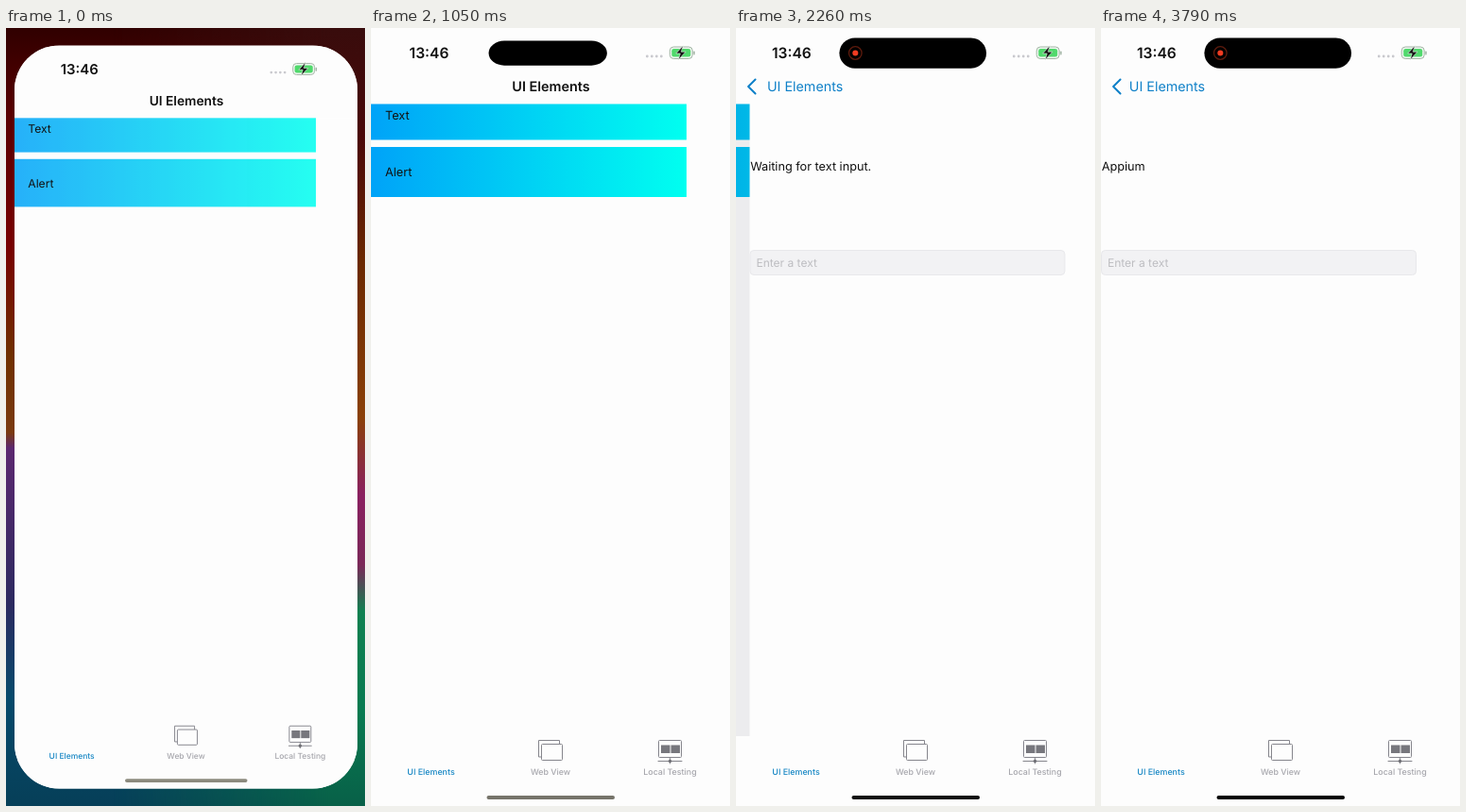
An HTML page that plays this animation: 380 by 824 pixels, repeating every 3840 ms.

```html
<!DOCTYPE html>
<html lang="en">
<head>
<meta charset="utf-8">
<title>UI Elements</title>
<style>
  html, body { margin: 0; width: 100%; height: 100%; overflow: hidden; }
  body > * { position: absolute; left: 0; top: 0; width: 380px; height: 824px; }
  #wallLeft { background: linear-gradient(#300000, #5c0000 12%, #780000 28%, #703000 42%, #7a3a10 52%, #5c2870 54%, #2c2a60 74%, #064a6c 86%, #063f58); }
  #wallRight {
    background: linear-gradient(#380c0c, #4a0808 14%, #6a2800 30%, #8a4008 50%, #8a2060 60%, #7a2858 69%, #108050 75%, #087a50 88%, #086048);
    mask-image: linear-gradient(90deg, transparent 30%, #000 90%);
  }
  text { font-family: Inter, Roboto, sans-serif; text-rendering: geometricPrecision; white-space: pre; }
</style>
</head>
<body>
<div id="wallLeft"></div>
<div id="wallRight"></div>
<svg id="screen" viewBox="0 0 380 824"></svg>
<script>
const LOOP = 3840, KEYBOARD_HEIGHT = 281;
const PAPER = '#fdfdfd', BLUE = '#0f80c8', HINT = '#bdbdc1', OUTLINE = '#85858c', INACTIVE = '#a6a6ac';

const rect = (x, y, w, h, fill, rx = 0, extra = '') =>
  `<rect x="${x}" y="${y}" width="${w}" height="${h}" rx="${rx}" fill="${fill}" ${extra}/>`;
const circle = (x, y, r, fill, extra = '') =>
  `<circle cx="${x}" cy="${y}" r="${r}" fill="${fill}" ${extra}/>`;
const path = (d, stroke, width = 1, fill = 'none') =>
  `<path d="${d}" fill="${fill}" stroke="${stroke}" stroke-width="${width}" stroke-linejoin="round" stroke-linecap="round"/>`;
const text = (x, y, str, size, fill = '#111', weight = 400, anchor = 'start', extra = '') =>
  `<text x="${x}" y="${y}" font-size="${size}" fill="${fill}" font-weight="${weight}" text-anchor="${anchor}" ${extra}>${str}</text>`;
const group = (id, ...parts) => `<g id="${id}">${parts.join('')}</g>`;

const home = group('home',
  rect(0, 0, 380, 824, PAPER),
  group('buttons',
    rect(0, 66, 334, 52.5, 'url(#sky)'),
    rect(0, 126, 334, 53, 'url(#sky)')),
  text(15, 96.6, 'Text', 12.7),
  text(15, 157.2, 'Alert', 12.7));

const form = group('form',
  rect(0, 0, 380, 824, PAPER),
  text(.7, 151, 'Waiting for text input.', 12.7, '#111', 400, 'start', 'id="label"'),
  rect(.5, 235.5, 333, 26, '#f2f2f4', 4, 'stroke="#e8e8eb"'),
  text(7, 253, '', 12, HINT, 400, 'start', 'id="field"'),
  rect(6, 240, 2, 17, '#4a66d8', 1, 'id="caret"'));

const nav = group('nav',
  rect(0, 0, 380, 80.5, PAPER),
  text(190.5, 67, 'UI Elements', 14.4, '#111', 600, 'middle', 'id="title"'),
  group('back',
    text(70, 67, 'UI Elements', 14.3, BLUE, 400, 'middle', 'id="backTitle"'),
    path('M20.5 54.5 L13 62 L20.5 69.5', BLUE, 2)));

const tabs = group('tabs',
  rect(0, 750, 380, 74, PAPER),
  path('M180 772 H177.500 V754.500 H199.500 V758', OUTLINE),
  rect(180.5, 758.5, 22, 17, 'none', 1, `stroke="${OUTLINE}"`),
  rect(304.5, 754.5, 24, 18, 'none', 1, `stroke="${OUTLINE}"`),
  rect(307, 759.5, 9.5, 8.5, '#77777d'),
  rect(317.5, 759.5, 9.5, 8.5, '#77777d'),
  path('M316.500 773 V779 M304 776.500 H329', OUTLINE),
  circle(316.5, 776.5, 1.8, '#707076'),
  text(63.5, 790.5, 'UI Elements', 8.9, '#1686c4', 500, 'middle'),
  text(190, 790.5, 'Web View', 8.8, INACTIVE, 500, 'middle'),
  text(316.5, 790.5, 'Local Testing', 8.9, INACTIVE, 500, 'middle'));

function key(x, y, w, label, size = 21, fill = PAPER) {
  const baseline = y + 20.5 + size * .33;
  return rect(x, y + 1, w, 41, '#989ca4', 5) + rect(x, y, w, 41, fill, 5) +
    text(x + w / 2, baseline, label, size, '#111', 400, 'middle');
}
const row = (letters, x, y) =>
  [...letters].map((c, i) => key(x + i * 37.7, y, 33.5, c)).join('');

const GREY = '#b4bac6';
const keyboard = group('keyboard',
  rect(0, 0, 380, KEYBOARD_HEIGHT + 4, '#dee1e7'),
  row('qwertyuiop', 3.7, 6), row('asdfghjkl', 22.9, 56), row('zxcvbnm', 61, 106),
  key(3.7, 106, 41.5, '', 13, GREY), key(335.5, 106, 41.5, '', 13, GREY),
  path('M24.500 118 L33.500 127 H28.500 V134.500 H20.500 V127 H15.500 Z', '#111', 1.5),
  path('M353 119.500 H365 V134.500 H353 L346.500 127 Z M355.500 124 L361.500 130 M361.500 124 L355.500 130', '#111', 1.5),
  key(3.7, 156, 91.5, '123', 13.3, GREY), key(99, 156, 185, 'space', 13.5),
  key(288, 156, 89, 'return', 13.5, GREY));

const status = [
  text(51, 32, '13:46', 15.6, '#111', 600, 'start', 'id="clock"'),
  group('battery',
    [284.5, 289.5, 294.5, 299.5].map(x => circle(x, 30, 1.4, '#c9c9ce')).join(''),
    rect(308.5, 20, 24, 12.5, '#f0f7f1', 4, 'stroke="#a3b5a5"'),
    rect(310.5, 22, 20, 8.5, '#50d96c', 2.3),
    rect(333.5, 24.5, 1.5, 4, '#a3b5a5', .7),
    path('M322.500 18.800 L315 27 H319.500 L317.500 33.700 L325.300 25.200 H320.800 Z', '#f2fbf3', .6, '#111')),
  rect(109, 10, 156, 33, '#000', 16.5, 'id="island"'),
  group('record',
    circle(126.3, 26.5, 6.8, 'none', 'stroke="#5e1b0d" stroke-width="1.3"'),
    circle(126.3, 26.5, 3, '#f23c22')),
  rect(122.5, 813, 135.5, 4, '#000', 2, 'id="indicator"')].join('');

const screen = document.getElementById('screen');
screen.innerHTML = `<defs>
  <linearGradient id="sky" gradientUnits="userSpaceOnUse" x1="0" x2="334">
    <stop stop-color="#00a3f8"/><stop offset="1" stop-color="#00fff0"/></linearGradient>
  <clipPath id="corners">${rect(0, 0, 380, 824, '#000', 0, 'id="frame"')}</clipPath></defs>` +
  `<g id="phone" clip-path="url(#corners)">${home}` +
  rect(0, 0, 380, 824, '#000020', 0, 'id="shade"') +
  form + nav + tabs + keyboard + status + '</g>';

const ui = {};
screen.querySelectorAll('[id]').forEach(el => ui[el.id] = el);
const set = (id, attrs) => {
  for (const name in attrs) ui[id].setAttribute(name, attrs[name]);
};
const clamp = v => Math.min(1, Math.max(0, v));
const mix = (a, b, p) => a + (b - a) * p;
const shift = (x, y = 0) => `translate(${x} ${y})`;

// Critically damped spring from 0 to 1.
function spring(t, start, rate) {
  const x = Math.max(0, t - start) / 1000 * rate;
  return 1 - (1 + x) * Math.exp(-x);
}
const smooth = (t, from, to) => {
  const p = clamp((t - from) / (to - from));
  return p * p * (3 - 2 * p);
};

function draw(t) {
  // App launch
  const launch = t < 550 ? Math.exp(-t / 120) : 0;
  const scale = 1 - .045 * launch;
  set('phone', { transform: `translate(190.500 412.500) scale(${scale}) translate(${mix(-190.5, -190, launch)} -412.500)` });
  set('frame', { rx: 50 * Math.sqrt(launch) });
  set('buttons', { opacity: 1 - .15 * launch });

  // Recording island
  const grow = smooth(t, 800, 1150);
  set('clock', { x: mix(51, 38, grow) });
  set('battery', { transform: shift(9.7 * grow) });
  set('island', { x: 187.2 - 77.8 * grow, width: 155.6 * grow, y: 26.6 - 16.2 * grow, height: 32.4 * grow });
  set('record', { opacity: smooth(t, 1050, 1250) });
  const ink = smooth(t, 500, 2700);
  set('indicator', { fill: `rgb(${[140, 138, 126].map(c => Math.round(c * (1 - ink)))})` });

  // Push to the text form
  const push = t > 2650 ? 1 : spring(t, 1800, 11);
  set('home', { transform: shift(-114 * push) });
  set('form', { transform: shift(380 * (1 - push)) });
  set('shade', { opacity: .07 * push });
  const center = mix(190.5, 70, spring(t, 1800, 12));
  set('title', { x: center, opacity: clamp(1 - push * 1.6) });
  set('backTitle', { x: center });
  set('back', { opacity: clamp(push * 1.6 - .5) });

  // Typing and keyboard
  const sent = t >= 3080;
  const typed = sent ? '' : 'Appium'.slice(0, Math.max(0, Math.floor((t - 2985) / 14)));
  ui.label.textContent = sent ? 'Appium' : 'Waiting for text input.';
  ui.field.textContent = typed || 'Enter a text';
  set('field', { fill: typed ? '#111' : HINT });
  set('caret', { opacity: +(t >= 2680 && !sent), x: 6 + (typed ? ui.field.getComputedTextLength() + 1 : 0) });
  const raised = KEYBOARD_HEIGHT * (spring(t, 2732, 6.6) - spring(t, 3090, 11));
  set('keyboard', { transform: shift(0, 824 - (raised < 3 ? -10 : raised)) });
}

function tick() {
  draw(performance.now() % LOOP);
  requestAnimationFrame(tick);
}
tick();
</script>
</body>
</html>
```
